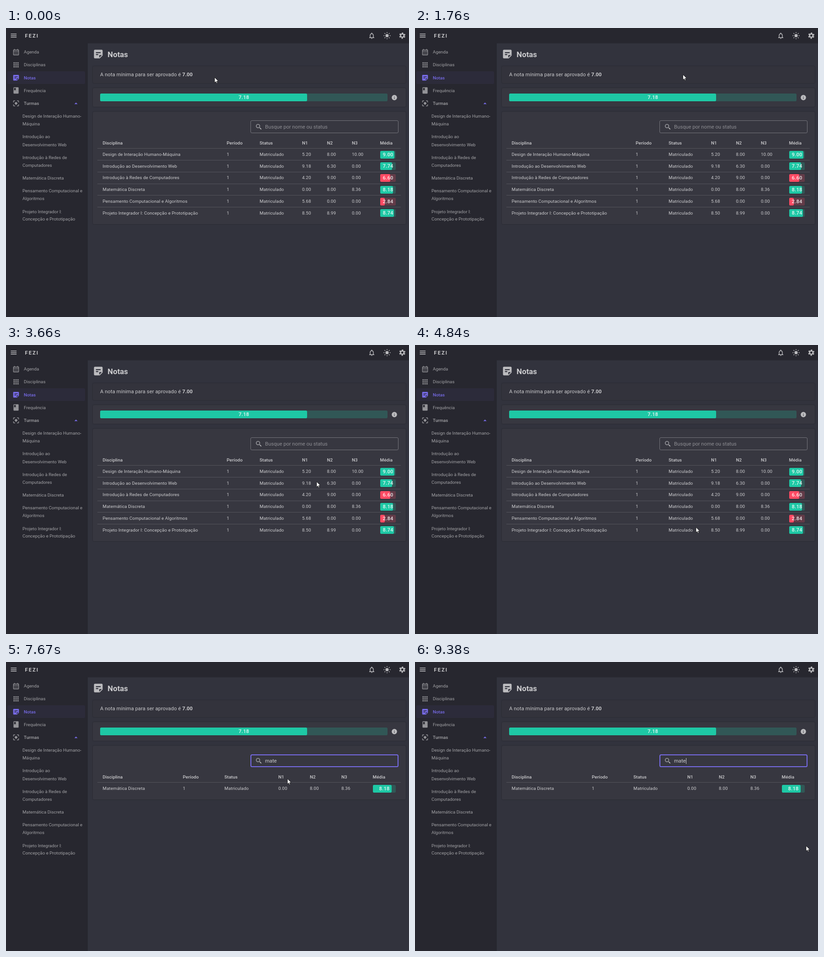
An HTML page that plays this animation: 882 px wide and 635 px high, repeating every 9.42 s.

```html
<!DOCTYPE html>
<html lang="pt-BR">
<head>
<meta charset="utf-8">
<title>Notas</title>
<style>
  html, body { margin: 0; width: 100%; height: 100%; overflow: hidden; background: #32333d; }
  svg { display: block; width: 882px; height: 635px; font: 9.8px Roboto, sans-serif; }
  text { fill: rgba(255,255,255,.75); white-space: pre; }
  .nav { fill: rgba(255,255,255,.57); }
  .on { fill: #776be7; }
  .mid { font-weight: 500; }
  .body { font-size: 11.2px; }
  .spaced { letter-spacing: .0107em; }
  .score { font-size: 11.2px; font-weight: 700; letter-spacing: .009em; text-anchor: middle; }
  .hint { font-size: 11.2px; fill: rgba(255,255,255,.43); }
  .paper { fill: #373740; filter: drop-shadow(0 .8px .8px rgba(0,0,0,.35)); }
  .flat { fill: #33333c; }
  .icon { fill: #bcbcbf; }
  .icon.nav { fill: #939397; }
  .icon.on { fill: #776be7; }
  .line { stroke: #54545c; }
</style>
</head>
<body>
<svg id="stage" viewBox="0 0 882 635"></svg>
<script>
const LOOP = 9420, BLINK = 530, FOCUS = 5670;
const stage = document.getElementById('stage');

const keys = [[6360, 'm'], [6480, 'ma'], [6690, 'mat'], [6810, 'mate']];

// time, x, y of the pointer
const path = [
  [0, 456.6, 108.5], [130, 456.6, 108.5], [450, 448, 102], [750, 440, 98],
  [1050, 450, 104], [1310, 458, 106], [1580, 458, 106], [1760, 586, 102.3],
  [2100, 730, 128], [2560, 853, 150], [3350, 853, 150], [3660, 680, 300.3],
  [3980, 662, 325], [4280, 690, 322], [4560, 660, 378], [4830, 615, 400.5],
  [5030, 615, 400.5], [5350, 612, 300], [5640, 613, 222], [7340, 613, 222],
  [7670, 616, 256.5], [8000, 570, 271], [8300, 532, 275], [8900, 845, 277],
  [9200, 845, 277], [9370, 856, 404], [LOOP, 856, 404]
];

const rows = [
  ['Design de Interação Humano-Máquina', '5.20', '8.00', '10.00', 9],
  ['Introdução ao Desenvolvimento Web', '9.18', '6.30', '0.00', 7.74],
  ['Introdução à Redes de Computadores', '4.20', '9.00', '0.00', 6.6],
  ['Matemática Discreta', '0.00', '8.00', '8.36', 8.18],
  ['Pensamento Computacional e Algoritmos', '5.68', '0.00', '0.00', 2.84],
  ['Projeto Integrador I: Concepção e Prototipação', '8.50', '8.99', '0.00', 8.74]
];
const heads = ['Disciplina', 'Período', 'Status', 'N1', 'N2', 'N3', 'Média'];

const glyphs = {
  menu: '<path d="M3 6h18v2H3zM3 11h18v2H3zM3 16h18v2H3z"/>',
  date: '<path fill-rule="evenodd" d="M19 4h-1V2h-2v2H8V2H6v2H5a2 2 0 0 0-2 2v14a2 2 0 0 0 2 2h14a2 2 0 0 0 2-2V6a2 2 0 0 0-2-2zm0 16H5V10h14zm0-12H5V6h14z"/>' +
    '<path d="M7 12h2v2H7zM11 12h2v2h-2zM15 12h2v2h-2zM7 16h2v2H7zM11 16h2v2h-2zM15 16h2v2h-2z"/>',
  apps: [4, 10, 16].map(x => [4, 10, 16].map(y => `<rect x="${x}" y="${y}" width="4" height="4"/>`).join('')).join(''),
  note: '<path fill-rule="evenodd" d="M19 3H5a2 2 0 0 0-2 2v14a2 2 0 0 0 2 2h10l6-6V5a2 2 0 0 0-2-2zM7 8h10v2H7zm5 6H7v-2h5zm2 5.5V14h5.5z"/>',
  book: '<path fill-rule="evenodd" d="M18 2H6a2 2 0 0 0-2 2v16a2 2 0 0 0 2 2h12a2 2 0 0 0 2-2V4a2 2 0 0 0-2-2zM6 4h5v8l-2.5-1.5L6 12z"/>',
  focus: '<circle cx="12" cy="12" r="4"/><path d="M5 15H3v4a2 2 0 0 0 2 2h4v-2H5zM5 5h4V3H5a2 2 0 0 0-2 2v4h2zM19 3h-4v2h4v4h2V5a2 2 0 0 0-2-2zM19 19h-4v2h4a2 2 0 0 0 2-2v-4h-2z"/>',
  bell: '<path fill-rule="evenodd" d="M12 22a2 2 0 0 0 2-2h-4a2 2 0 0 0 2 2zm6-6v-5c0-3.07-1.64-5.64-4.5-6.32V4a1.5 1.5 0 0 0-3 0v.68C7.63 5.36 6 7.92 6 11v5l-2 2v1h16v-1zm-2 1H8v-6c0-2.48 1.51-4.5 4-4.5s4 2.02 4 4.5z"/>',
  sun: '<circle cx="12" cy="12" r="5"/>' + teeth(9.5, 3, 16, .55, .275),
  gear: '<circle cx="12" cy="12" r="5.3" fill="none" stroke="#bcbcbf" stroke-width="3.6"/>' + teeth(8.2, 3.2, 12, 1, -.5),
  info: '<path fill-rule="evenodd" d="M12 2a10 10 0 1 0 0 20a10 10 0 0 0 0-20zm1 15h-2v-6h2zm0-8h-2V7h2z"/>',
  find: '<circle cx="9.5" cy="9.5" r="5.5" fill="none" stroke="#a9a9ad" stroke-width="2"/><path d="M14 15.5l1.5-1.5 5 5-1.5 1.5z"/>'
};

function teeth(r, width, total, dash, offset) {
  return `<circle cx="12" cy="12" r="${r}" fill="none" stroke="#bcbcbf" stroke-width="${width}" pathLength="${total}"
    stroke-dasharray="${dash} ${2 - dash}" stroke-dashoffset="${offset}"/>`;
}

// x, y is the centre of the icon
function icon(name, x, y, cls = '', scale = .7) {
  return `<g class="icon ${cls}" transform="translate(${x - 12 * scale} ${y - 12 * scale}) scale(${scale})">${glyphs[name]}</g>`;
}

// Baselines sit on whole pixels
const text = (s, x, y, cls = '', attrs = '') =>
  `<text x="${x}" y="${Math.round(y)}" class="${cls}" ${attrs}>${s}</text>`;

const box = (x, y, w, h, attrs, r = 2.8) =>
  `<rect x="${x}" y="${y}" width="${w}" height="${h}" rx="${r}" ${attrs}/>`;

function bar(x, y, w, value) {
  const fill = `fill="${value < 7 ? '#ff4a63' : '#1ec8a5'}"`;
  const part = Math.round(w * Math.round(value * 10) / 100);
  return box(x, y, w, 17, fill + ' fill-opacity=".22"') + box(x, y, part, 17, fill) +
    text(value.toFixed(2), x + w / 2, y + 12.4, 'score');
}

function sidebar() {
  const items = [['Agenda', 'date', 53], ['Disciplinas', 'apps', 81], ['Notas', 'note', 109.3],
    ['Frequência', 'book', 137.3], ['Turmas', 'focus', 165.6]];
  const subs = [['Design de Interação Humano-', 194], ['Máquina', 211], ['Introdução ao', 239],
    ['Desenvolvimento Web', 256.3], ['Introdução à Redes de', 284.3], ['Computadores', 301.3],
    ['Matemática Discreta', 329.4], ['Pensamento Computacional e', 358], ['Algoritmos', 374.7],
    ['Projeto Integrador I:', 403.3], ['Concepção e Prototipação', 420.2]];
  return box(0, 0, 179, 635, 'fill="#27272f"', 0) +
    box(3, 95, 170, 28, 'fill="#776be7" fill-opacity=".06"') +
    items.map(([s, g, y]) => {
      const cls = s === 'Notas' ? 'on' : 'nav';
      return icon(g, 22, y, cls) + text(s, 39, y + 3.3, cls + (/Notas|Turmas/.test(s) ? ' mid' : ''));
    }).join('') +
    '<path class="on" d="M149.7 167.3h7l-3.5-3.5z"/>' +
    subs.map(([s, y]) => text(s, 36, y + 3.2, 'nav')).join('');
}

function topbar() {
  return box(0, 0, 882, 33.6, 'fill="#27272f"', 0) + icon('menu', 16.8, 16.8) +
    text('FEZI', 41.5, 21, 'body', 'font-weight="700" letter-spacing="2"') +
    icon('bell', 800.5, 17) + icon('sun', 834, 16.8) + icon('gear', 867.3, 16.8);
}

function table(id, list, cols) {
  const pitch = 25.76, left = cols[6] + .5;
  let out = `<g id="${id}">` + box(190, 184, 685, Math.round(117.7 + pitch * (list.length - 1)), 'class="paper"');
  heads.forEach((h, i) => out += text(h, cols[i], 255.6, 'mid spaced'));
  list.forEach(([name, n1, n2, n3, avg], i) => {
    const y = 277.3 + pitch * i;
    [name, '1', 'Matriculado', n1, n2, n3].forEach((s, c) => out += text(s, cols[c], y + 3.5, 'spaced'));
    out += `<path class="line" d="M200 ${Math.floor(y - 12.4) + .5}H864"/>` +
      bar(left, Math.round(y - 7.8), 853 - left, avg);
  });
  return out + '</g>';
}

stage.innerHTML = box(0, 0, 882, 635, 'fill="#32333d"', 0) + sidebar() + topbar() +
  icon('note', 202, 57.3, '', 1.05) +
  text('Notas', 222.3, 64, '', 'font-size="16.8" font-weight="700"') +
  box(190, 84, 685, 37, 'class="paper flat"') +
  text('A nota mínima para ser aprovado é <tspan font-weight="700">7.00</tspan>', 206, 106, 'body', 'letter-spacing=".1"') +
  box(190, 132, 685, 41, 'class="paper"') + bar(206, 144, 629, 7.18) +
  icon('info', 850, 152.8, '', .583) +
  table('all', rows, [211.5, 483, 555, 648, 702.5, 757, 818.5]) +
  table('found', [rows[3]], [211.5, 387, 478, 596, 665, 734, 802.5]) +
  '<rect id="field" rx="2.5" fill="none"/>' + icon('find', 553.3, 217.2) +
  text('Busque por nome ou status', 567, 221, 'hint') +
  text('', 567, 221, 'body', 'id="typed"') +
  '<rect id="caret" y="211" width="1" height="13" fill="#c8c8cb"/>' +
  '<path id="arrow" d="M0 0V11.6L2.7 9.1 4.4 13 6.2 12.2 4.5 8.4H8.2Z" fill="#fff" stroke="#000" stroke-width=".7"/>' +
  '<path id="beam" d="M-2.5-5.5H-.8L0-4.9.8-5.5H2.5M-2.5 5.5H-.8L0 4.9.8 5.5H2.5M0-4.9V4.9" fill="none" stroke="#c4c4c8" stroke-width=".8"/>';

const $ = id => document.getElementById(id);
const [all, found, field, typed, caret, arrow, beam] =
  ['all', 'found', 'field', 'typed', 'caret', 'arrow', 'beam'].map($);
const hint = stage.querySelector('.hint');
const show = (el, on) => el.style.visibility = on ? 'visible' : 'hidden';

function set(el, attrs) {
  for (const name in attrs) el.setAttribute(name, attrs[name]);
}

// The border lies inside the box
function outline(stroke, width) {
  set(field, {
    x: 535 + width / 2, y: 203 + width / 2, width: 324 - width, height: 28 - width,
    stroke, 'stroke-width': width
  });
}

// Monotone cubic through the points, so rests stay still
function along(t, axis) {
  const i = Math.max(0, path.findIndex(p => p[0] > t) - 1);
  const slope = k => path[k] && path[k + 1]
    ? (path[k + 1][axis] - path[k][axis]) / (path[k + 1][0] - path[k][0]) : 0;
  const tangent = k => {
    const a = slope(k - 1), b = slope(k);
    return a * b > 0 ? 2 * a * b / (a + b) : 0;
  };
  const a = path[i], b = path[i + 1], d = b[0] - a[0], u = (t - a[0]) / d, v = 1 - u;
  return a[axis] * (1 + 2 * u) * v * v + b[axis] * u * u * (3 - 2 * u) +
    d * u * v * (tangent(i) * v - tangent(i + 1) * u);
}

function draw(t) {
  const x = along(t, 1), y = along(t, 2);
  const focused = t >= FOCUS;
  const [last, word] = keys.filter(k => k[0] <= t).pop() || [FOCUS, ''];
  const filtered = word === 'mate';

  show(all, !filtered);
  show(found, filtered);
  show(hint, !word);
  typed.textContent = word;
  if (focused) outline('#776be7', 2);
  else outline('#75757c', 1);

  show(caret, focused && Math.floor((t - last) / BLINK) % 2 === 0);
  set(caret, { x: Math.round(567 + (word ? typed.getComputedTextLength() : 0)) });

  const typing = t >= keys[0][0] && t < 7345;
  const inField = x > 535 && x < 859 && y > 203 && y < 231;
  show(arrow, !typing && !inField);
  show(beam, !typing && inField);
  for (const el of [arrow, beam]) set(el, { transform: `translate(${x.toFixed(1)} ${y.toFixed(1)})` });
}

const start = performance.now();
function tick() {
  draw((performance.now() - start) % LOOP);
  requestAnimationFrame(tick);
}
tick();
</script>
</body>
</html>
```
